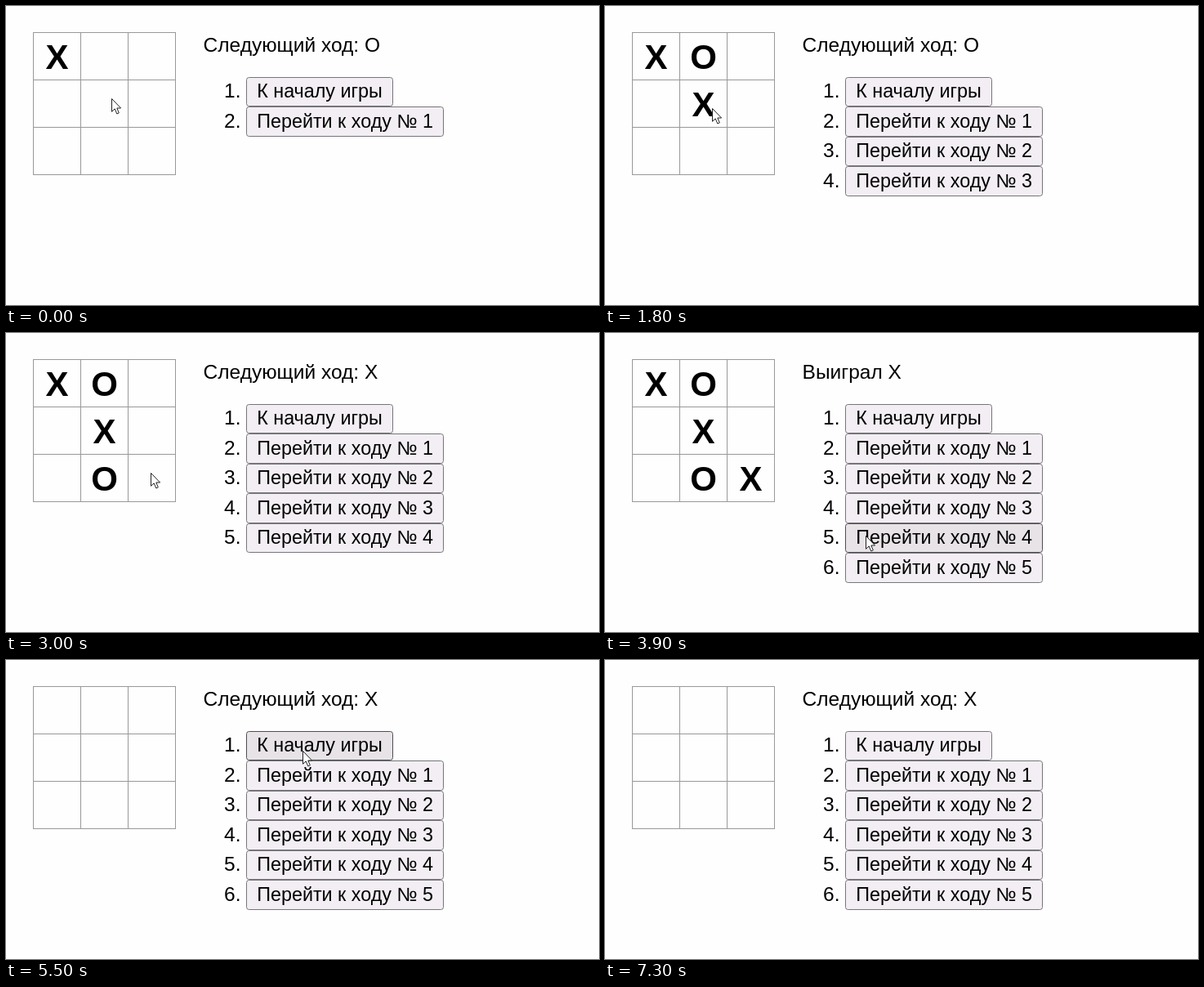
These frames come from a looping animation (726x366 px, 7.6 s). An HTML page:

```html
<!DOCTYPE html>
<html lang="ru">
<head>
<meta charset="utf-8">
<title>Крестики-нолики</title>
<style>
html, body { margin: 0; width: 100%; height: 100%; overflow: hidden; background: #fefefe; }
svg { display: block; width: 726px; height: 366px; font-family: "Liberation Sans", Arial, sans-serif; }
text { font-size: 24.5px; fill: #000; }
.grid { stroke: #999; }
.mark { font-size: 42px; font-weight: bold; text-anchor: middle; }
.label { font-size: 23.33px; }
.button { fill: #f2eef3; stroke: #767579; }
.hover .button { fill: #e7e3e7; stroke: #4f4e52; }
.cursor { fill: #fff; stroke: #222; stroke-linejoin: round; }
</style>
</head>
<body>
<svg viewBox="0 0 726 366"></svg>
<script>
const LOOP = 7600, STEP = 100;
const LEFT = 33, TOP = 32, CELL = 58, SIDE = 3 * CELL;
const LIST = 294, ROWS = 6;
const svg = document.querySelector("svg");

// Cells taken in turn, X first.
const moves = [0, 1, 4, 7, 8];

// Clicks of the pointer: [time, x, y]. The last one lies past the loop's end.
const clicks = [
  [600, 129, 113], [1100, 131, 66], [1700, 131, 125], [2500, 133, 178], [3200, 177, 171],
  [4300, 319, 248], [4500, 346, 212], [4800, 363, 172], [5000, 363, 146], [5500, 363, 111],
  [6000, 363, 111], [8000, 460, 366]
];

function add(tag, attrs, parent = svg, text = "") {
  const el = document.createElementNS("http://www.w3.org/2000/svg", tag);
  for (const key in attrs) el.setAttribute(key, attrs[key]);
  el.textContent = text;
  return parent.appendChild(el);
}

const show = (el, on) => el.setAttribute("visibility", on ? "visible" : "hidden");

for (let i = 0; i < 4; i++) {
  const x = LEFT + i * CELL + 0.5, y = TOP + i * CELL + 0.5;
  add("path", { class: "grid", d: `M${LEFT} ${y}h${SIDE + 1}M${x} ${TOP}v${SIDE + 1}` });
}

const marks = moves.map((cell, i) => add("text", {
  class: "mark",
  x: LEFT + CELL * (cell % 3 + 0.5) + 0.5,
  y: TOP + CELL * Math.floor(cell / 3) + 45
}, svg, i % 2 ? "O" : "X"));

const status = add("text", { x: 241.6, y: 56 });

const rowTop = i => Math.floor(87 + 36.5 * i);
const rowWidth = i => i ? 242 : 180;

const rows = Array.from({ length: ROWS }, (_, i) => {
  const el = add("g", {}), top = rowTop(i), y = Math.round(112 + 36.5 * i);
  add("text", { x: 267, y }, el, `${i + 1}.`);
  add("rect", {
    class: "button", x: LIST + 0.5, y: top + 0.5,
    width: rowWidth(i) - 1, height: rowTop(i + 1) - top - 1, rx: 3
  }, el);
  add("text", { class: "label", x: LIST + 13.2, y }, el,
    i ? `Перейти к ходу № ${i}` : "К началу игры");
  return el;
});

const cursor = add("path", {
  class: "cursor",
  d: "M.5 .5V16.3L4.2 12.9L6.8 19L9.3 17.9L6.8 12H11.6Z"
});

const rowAt = (x, y) => rows.findIndex((_, i) =>
  x >= LIST && x < LIST + rowWidth(i) && y >= rowTop(i) && y < rowTop(i + 1));

// A click on the board plays the next move, one on the list goes back to a move.
function gameAt(t) {
  let count = 1, listed = 2;
  for (const [time, x, y] of clicks.slice(1)) {
    if (time > t) break;
    count = x < LEFT + SIDE ? count + 1 : rowAt(x, y);
    listed = Math.max(listed, count + 1);
  }
  return { count, listed };
}

// The pointer rests after a click, glides over, and rests before the next.
function pointerAt(t) {
  const i = Math.max(1, clicks.findIndex(c => c[0] > t));
  const [t0, x0, y0] = clicks[i - 1], [t1, x1, y1] = clicks[i];
  const part = (t - t0) / (t1 - t0);
  const k = Math.min(1, Math.max(0, (part - 0.25) / 0.35));
  const ease = k * k * (3 - 2 * k);
  return [x0 + (x1 - x0) * ease, y0 + (y1 - y0) * ease].map(Math.round);
}

function render(now) {
  const t = Math.floor(now % LOOP / STEP) * STEP;
  const { count, listed } = gameAt(t);
  const [x, y] = pointerAt(t);
  const hovered = rowAt(x, y);

  marks.forEach((el, i) => show(el, i < count));
  status.textContent = count === moves.length
    ? "Выиграл X"
    : "Следующий ход: " + (count % 2 ? "O" : "X");
  rows.forEach((el, i) => {
    show(el, i < listed);
    el.classList.toggle("hover", i === hovered);
  });
  cursor.setAttribute("transform", `translate(${x} ${y})`);
}

const start = performance.now();
function tick() {
  render(performance.now() - start);
  requestAnimationFrame(tick);
}
tick();
</script>
</body>
</html>
```
